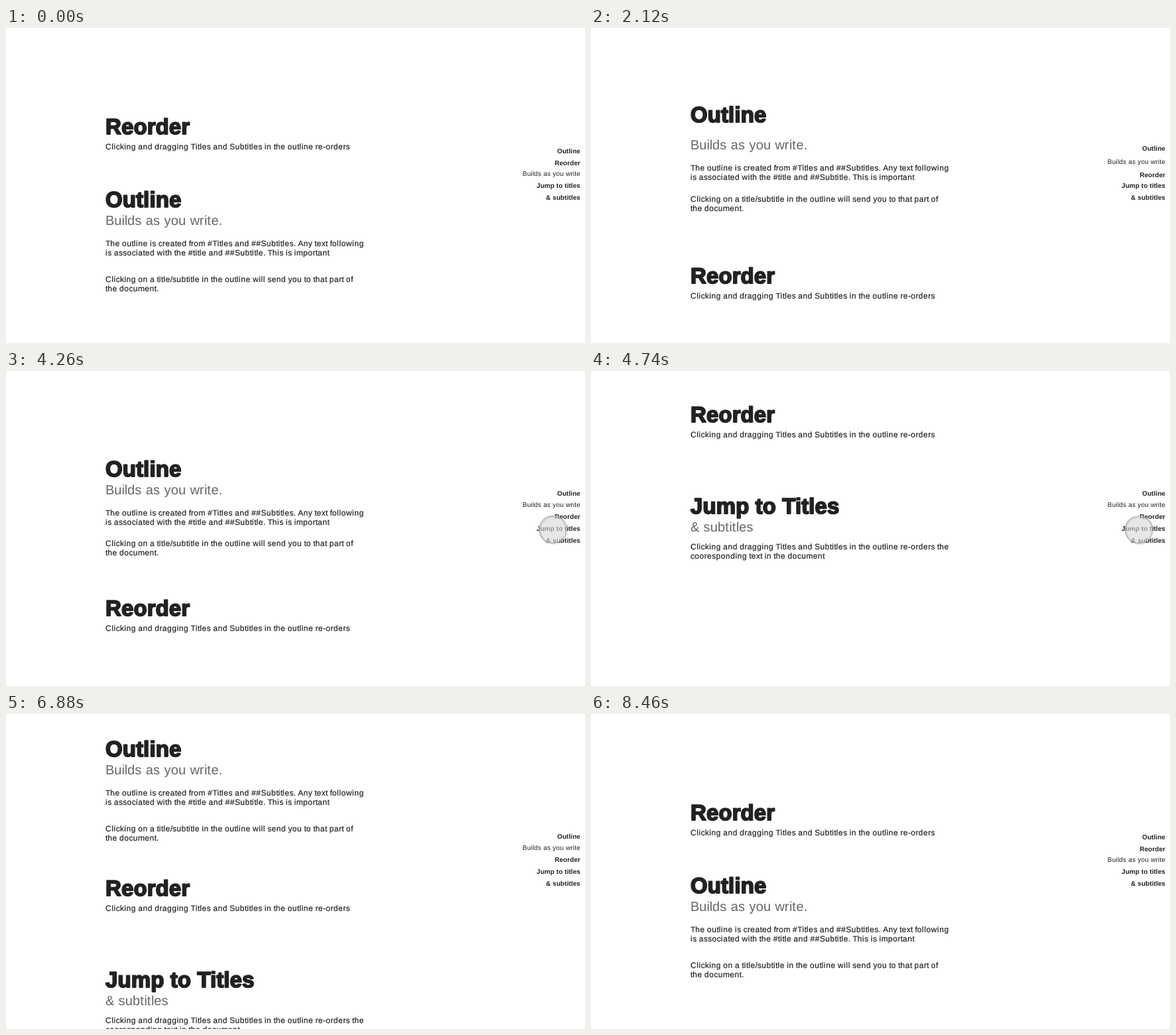
Animation of 873x475 px, one loop 8480 ms. Source, as an HTML page:

```html
<!DOCTYPE html>
<html lang="en">
<head>
<meta charset="utf-8">
<title>Outline reorder</title>
<style>
  html, body { margin: 0; width: 100%; height: 100%; overflow: hidden; background: #fff; }
  svg { display: block; width: 873px; height: 475px; }
  text { font-family: "Liberation Sans", Arial, sans-serif; fill: #222; text-rendering: geometricPrecision; }
  .title { font-size: 33px; font-weight: 700; letter-spacing: .1px; stroke: #222; stroke-width: 1.9px; stroke-linejoin: round; }
  .sub { font-size: 20px; fill: #666; }
  .body { font-size: 12px; stroke: #222; stroke-width: .2px; }
  .nav { font-size: 10px; text-anchor: end; letter-spacing: .2px; }
  .nav.bold { font-weight: 700; letter-spacing: .07px; }
  .ring { fill: none; stroke: #aaa; stroke-width: 1.1px; filter: drop-shadow(1px 1.5px 1px rgba(0, 0, 0, .25)); }
</style>
</head>
<body>
<svg id="stage" viewBox="0 0 873 475">
  <g id="text"></g>
  <g id="pointer">
    <circle r="20.6" fill="rgba(216,216,216,.62)"/>
    <circle class="ring" r="20.6"/>
  </g>
</svg>
<script>
const NS = 'http://www.w3.org/2000/svg';
const LOOP = 8480, STEP = 20, SCROLL = 304, TRACKING = .25;
const layer = document.getElementById('text');
const pointer = document.getElementById('pointer');
const ruler = document.createElement('canvas').getContext('2d');

// Each entry: class, lines, baselines in the three arrangements (and after the page returns)
const page = [
  ['title', ['Outline'], [270, 388, 159]],
  ['sub', ['Builds as you write.'], [297, 226, 186]],
  ['body', ['The outline is created from #Titles and ##Subtitles. Any text following',
            'is associated with the #title and ##Subtitle. This is important'], [329, 253, 218]],
  ['body', ['Clicking on a title/subtitle in the outline will send you to that part of',
            'the document.'], [383, 294, 264, 272]],
  ['title', ['Reorder'], [160, 160, 369]],
  ['body', ['Clicking and dragging Titles and Subtitles in the outline re-orders'], [183, 183, 392]],
  ['title', ['Jump to Titles'], [507, 507, 507]],
  ['sub', ['& subtitles'], [534, 534, 534]],
  ['body', ['Clicking and dragging Titles and Subtitles in the outline re-orders the',
            'cooresponding text in the document'], [561, 561, 561]]
];
const nav = [
  ['nav bold', ['Outline'], [189, 226, 188]],
  ['nav', ['Builds as you write'], [223, 208, 205]],
  ['nav bold', ['Reorder'], [207, 193, 223]],
  ['nav bold', ['Jump to titles'], [241, 241, 241]],
  ['nav bold', ['& subtitles'], [259, 259, 259]]
];

// Glyph positions with advances rounded to whole pixels, plus tracking
function gridX(line, x, size) {
  ruler.font = `${size}px "Liberation Sans", Arial, sans-serif`;
  return [...line].map(ch => {
    const at = x;
    x += Math.round(ruler.measureText(ch).width) + TRACKING;
    return at;
  }).join(' ');
}

function make([cls, lines, ys], fixed) {
  const el = document.createElementNS(NS, 'text');
  const size = { body: 12, sub: 20 }[cls];
  const x = fixed ? 866 : 150;
  el.setAttribute('class', cls);
  lines.forEach((line, i) => {
    const span = document.createElementNS(NS, 'tspan');
    span.setAttribute('x', size ? gridX(line, x, size) : x);
    span.setAttribute('dy', i ? 14 : 0);
    span.textContent = line;
    el.append(span);
  });
  layer.append(el);
  return { el, ys, fixed };
}
const items = [...page.map(p => make(p, false)), ...nav.map(n => make(n, true))];

const clamp = v => Math.min(1, Math.max(0, v));
const mix = (a, b, k) => a + (b - a) * k;

// Underdamped spring: overshoots by about 7.5 percent, then settles
function spring(t, dur) {
  if (t <= 0) return 0;
  if (t >= dur) return 1;
  const s = t / 1000, w = 25, z = .636, d = w * Math.sqrt(1 - z * z);
  return 1 - Math.exp(-z * w * s) * (Math.cos(d * s) + z * w / d * Math.sin(d * s));
}

// Critically damped glide for the page scroll
function glide(t, dur, w) {
  if (t <= 0) return 0;
  if (t >= dur) return 1;
  const s = w * t / 1000;
  return 1 - (1 + s) * Math.exp(-s);
}

function curve(p, k) {
  const m = 1 - k;
  return [0, 1].map(i => m * m * m * p[0][i] + 3 * m * m * k * p[1][i] + 3 * m * k * k * p[2][i] + k * k * k * p[3][i]);
}
const enter = [[813, -20], [740, 80], [750, 300], [824.5, 237.5]];
const drift = [[824.5, 239], [829, 243], [826, 238], [822, 237]];
const leave = [[822, 237], [795, 215], [835, 150], [900, 200]];

function pointerAt(t) {
  if (t < 3360 || t > 6180) return null;
  if (t < 4260) return curve(enter, 1 - Math.pow(1 - clamp((t - 3360) / 820), 1.6));
  if (t < 5360) return curve(drift, clamp((t - 4380) / 600));
  const k = clamp((t - 5360) / 820);
  return curve(leave, k * k * (3 - 2 * k));
}

function baseline(ys, t) {
  const c = ys[2], back = ys[3] ?? c;
  if (t < 1960) return mix(ys[0], ys[1], spring(t - 740, 380));
  if (t < 6740) return mix(ys[1], c, spring(t - 1960, 400));
  return mix(back, ys[0], spring(t - 8120, 340));
}

function draw(t) {
  const scroll = SCROLL * (glide(t - 4380, 700, 14) - glide(t - 6740, 580, 17));
  for (const { el, ys, fixed } of items) {
    el.setAttribute('transform', `translate(0 ${(baseline(ys, t) - (fixed ? 0 : scroll)).toFixed(2)})`);
  }
  const p = pointerAt(t);
  pointer.style.display = p ? '' : 'none';
  if (p) pointer.setAttribute('transform', `translate(${p[0].toFixed(2)} ${p[1].toFixed(2)})`);
}

let start;
function tick(now) {
  start ??= now;
  draw(Math.floor((now - start) % LOOP / STEP) * STEP);
  requestAnimationFrame(tick);
}
draw(0);
requestAnimationFrame(tick);
</script>
</body>
</html>
```
